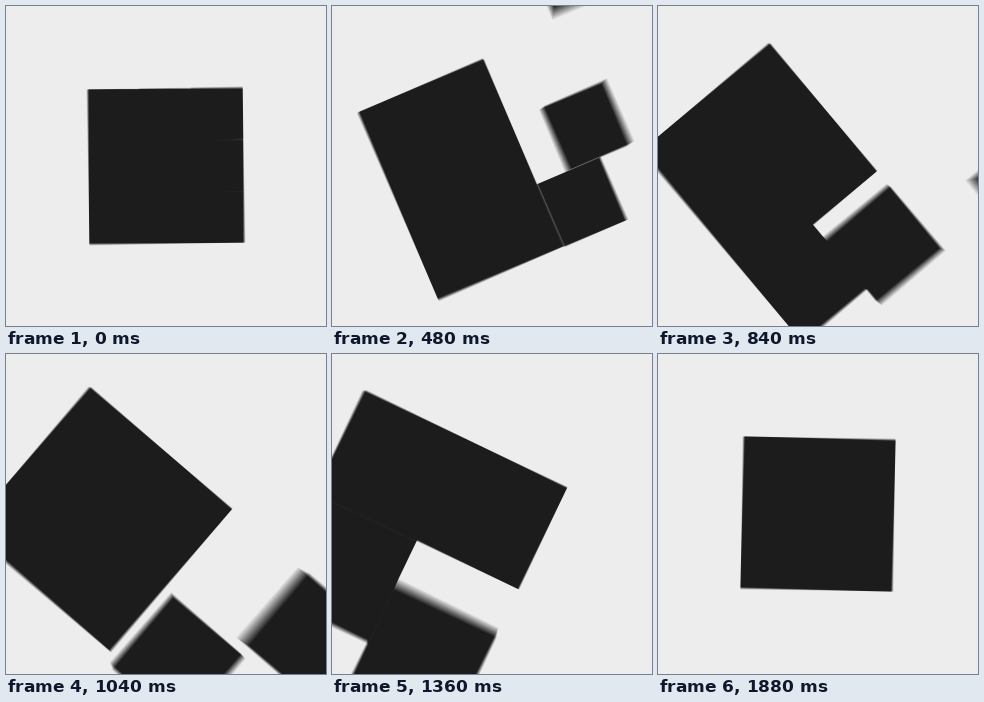
These frames come from a looping animation (320 by 320 pixels, 1.92 s). An HTML page with a canvas:

```html
<!DOCTYPE html>
<html lang="en">
<head>
<meta charset="utf-8">
<title>Splitting square</title>
<style>
html, body { margin: 0; width: 100%; height: 100%; overflow: hidden; background: #ededed; }
canvas { display: block; width: 320px; height: 320px; }
</style>
</head>
<body>
<canvas id="stage" width="320" height="320"></canvas>
<script>
const ctx = document.getElementById('stage').getContext('2d');
const SIZE = 320, LIGHT = '#ededed', DARK = '#1c1c1c';
const FRAMES = 48, STEP = 40;
const CELL = 51.2;        // a third of the square's side
const SAMPLES = 15, SHUTTER = 0.65;
const GAP = 5.63;         // frames between departures
const ACCEL = 0.1065;
const HALF = 0.502;       // slight overlap hides seams

// Outer cells, clockwise from the top right corner
const RING = [[1, -1], [1, 0], [1, 1], [0, 1], [-1, 1], [-1, 0], [-1, -1], [0, -1]];

function addCell(x, y) {
  ctx.rect(x - HALF, y - HALF, 2 * HALF, 2 * HALF);
}

// One sharp exposure: the whole turns a quarter and grows threefold per loop
function expose(f) {
  const p = f / FRAMES;
  ctx.save();
  ctx.translate(SIZE / 2, SIZE / 2);
  ctx.rotate(-p * Math.PI / 2);
  const scale = CELL * Math.pow(3, p);
  ctx.scale(scale, scale);
  ctx.beginPath();
  addCell(0, 0);
  RING.forEach(([x, y], k) => {
    const dist = (ACCEL * Math.max(0, f - k * GAP)) ** 2;
    const m = 1 + dist / Math.hypot(x, y);
    addCell(x * m, y * m);
  });
  ctx.fill();
  ctx.restore();
}

function fillStage(mode, color) {
  ctx.globalCompositeOperation = mode;
  ctx.globalAlpha = 1;
  ctx.fillStyle = color;
  ctx.fillRect(0, 0, SIZE, SIZE);
}

// Motion blur: add up exposures, then colour the result
function draw(frame) {
  ctx.clearRect(0, 0, SIZE, SIZE);
  ctx.globalCompositeOperation = 'lighter';
  ctx.globalAlpha = 1 / SAMPLES;
  ctx.fillStyle = '#fff';
  for (let i = 0; i < SAMPLES; i++) {
    expose(frame + SHUTTER * (i + 0.5) / SAMPLES);
  }
  fillStage('source-in', DARK);
  fillStage('destination-over', LIGHT);
}

let shown = -1;
function tick(now) {
  const frame = Math.floor(now / STEP) % FRAMES;
  if (frame !== shown) draw(shown = frame);
  requestAnimationFrame(tick);
}
draw(0);
requestAnimationFrame(tick);
</script>
</body>
</html>
```
